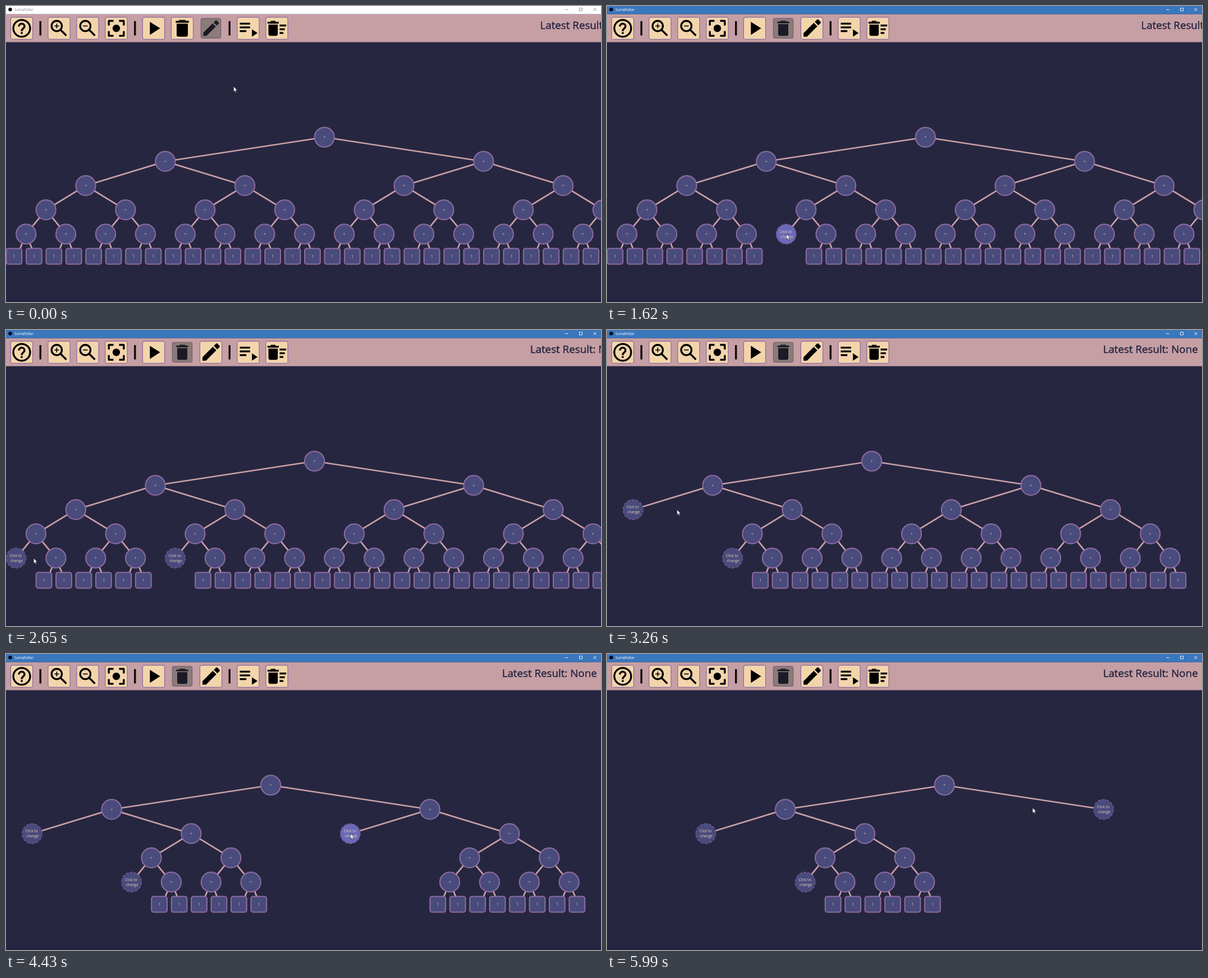
Write an HTML page with a canvas that moves like this. It is 1060 px wide and 528 px high and loops after 6850 ms.

```html
<!DOCTYPE html>
<html lang="en">
<head>
<meta charset="utf-8">
<title>Sumafolitar</title>
<style>
html, body { margin: 0; width: 100%; height: 100%; overflow: hidden; background: #272641; }
canvas { display: block; }
</style>
</head>
<body>
<canvas id="stage" width="1060" height="528"></canvas>
<script>
const ctx = document.getElementById('stage').getContext('2d');
const W = 1060, LOOP = 6850, TURN = Math.PI * 2;
const FONT = '"Open Sans", "Noto Sans", sans-serif';
const SPREAD = 283.5, ROW = 43.22, ROOT_Y = 234, DEPTH = 5, R = 18;
const INK = '#272541', PURPLE = '#8e6c9f', NODE = '#494b7c', HOVER = '#6a6ab9', CREAM = '#e6cfb4';

// Each click: the pointer leaves GAP after the last one, rests LEAD before pressing, holds for HOLD
const GAP = 90, LEAD = 130, HOLD = 80;
const clicks = [
  { press: 600, ease: 2 },
  { press: 1535, ease: 1.13, node: 20, bend: 13 },
  { press: 2570, ease: 2.65, node: 16, aside: 13 },
  { press: 3180, ease: 2, node: 4 },
  { press: 4350, ease: 1.44, node: 6, bend: 95 },
  { press: 5060, ease: 2, node: 3 }
];

const clamp = k => Math.min(1, Math.max(0, k));

function walk(gone, id = 1, x = 0, depth = 0, out = []) {
  const leaf = depth === DEPTH, removed = gone.has(id);
  const dx = leaf || removed ? 0 : SPREAD / 2 ** depth;
  out.push({ id, x, y: ROOT_Y + ROW * depth, dx, leaf, removed });
  if (dx) {
    walk(gone, id * 2, x - dx, depth + 1, out);
    walk(gone, id * 2 + 1, x + dx, depth + 1, out);
  }
  return out;
}

// A tree wider than the window starts at its left edge, a narrower one is centred
function layout(gone) {
  const nodes = walk(gone);
  const left = Math.min(...nodes.map(n => n.x)) - R;
  const right = Math.max(...nodes.map(n => n.x + (n.leaf ? 11.3 : R)));
  const wide = right - left > W;
  const shift = wide ? -left : W / 2 + 0.3 - (left + right) / 2;
  for (const n of nodes) n.x += shift;
  return { nodes, width: Math.max(W, right - left) };
}

const goneAfter = n => new Set(clicks.slice(0, n).map(c => c.node));

// Where the pointer goes for each click
const goals = clicks.map(({ node, aside = 0 }, i) => {
  if (!node) return { x: 314, y: 41 };
  const { x, y } = layout(goneAfter(i)).nodes.find(n => n.id === node);
  return { x: x + aside, y: y - 0.5 };
});

function pointerAt(t) {
  let from = { x: 405, y: 143 }, go = 70;
  for (let i = 0; i < clicks.length; i++) {
    const { press, ease, bend = 0 } = clicks[i], to = goals[i];
    const k = 1 - (1 - clamp((t - go) / (press - LEAD - go))) ** ease;
    if (k < 1) {
      const dx = to.x - from.x, dy = to.y - from.y;
      const side = bend * 4 * k * (1 - k) / Math.hypot(dx, dy);
      return { x: from.x + dx * k + dy * side, y: from.y + dy * k - dx * side };
    }
    from = to;
    go = press + HOLD + GAP;
  }
  const drift = clamp((t - 5300) / 150);
  return { x: from.x + 2.5 * drift, y: from.y - 3 * drift };
}

function rect(x, y, w, h, fill = ctx.fillStyle) {
  ctx.fillStyle = fill;
  ctx.fillRect(x, y, w, h);
}

function label(str, x, y, size, fill, align = 'center') {
  ctx.font = `${size}px ${FONT}`;
  ctx.textAlign = align;
  ctx.fillStyle = fill;
  ctx.fillText(str, x, y);
}

function shape(fill, stroke, width) {
  ctx.fillStyle = fill;
  ctx.fill();
  ctx.strokeStyle = stroke;
  ctx.lineWidth = width;
  ctx.stroke();
}

function disc(x, y, r) {
  ctx.beginPath();
  ctx.arc(x, y, r, 0, TURN);
}

function box(x, y, w, h, r) {
  ctx.beginPath();
  ctx.roundRect(x, y, w, h, r);
}

function poly(...pts) {
  ctx.beginPath();
  for (let i = 0; i < pts.length; i += 2) ctx.lineTo(pts[i], pts[i + 1]);
}

// Icons live on a 24 unit grid
function lens() {
  disc(9.5, 9.5, 5.5);
  ctx.stroke();
  poly(13.6, 13.6, 19.75, 19.75);
  ctx.stroke();
  rect(7, 9, 5, 1);
}

function bin(cx, top, w, h) {
  rect(cx - w / 2 + 2.5, top, w - 5, 1.1);
  rect(cx - w / 2 - 1, top + 1, w + 2, 2);
  box(cx - w / 2, top + 4, w, h, [0, 0, 2, 2]);
  ctx.fill();
}

function triangle(x, y, w, h) {
  poly(x, y, x, y + h, x + w, y + h / 2);
  ctx.fill();
}

const icons = {
  help() {
    disc(12, 12, 9);
    ctx.stroke();
    ctx.beginPath();
    ctx.arc(12, 10, 3, Math.PI, TURN);
    ctx.bezierCurveTo(15, 12, 12, 12.2, 12, 15);
    ctx.stroke();
    rect(11, 16, 2, 2);
  },
  zoomIn() {
    lens();
    rect(9, 7, 1, 5);
  },
  zoomOut: lens,
  center() {
    disc(12, 12, 4);
    ctx.fill();
    ctx.translate(12, 12);
    for (let i = 0; i < 4; i++) {
      ctx.rotate(TURN / 4);
      poly(-8, -3, -8, -8, -3, -8);
      ctx.stroke();
    }
  },
  play: () => triangle(8, 5, 11, 14),
  remove: () => bin(12, 3, 12, 14),
  edit() {
    ctx.translate(3, 21);
    ctx.rotate(-TURN / 8);
    poly(0, 0, 2.65, -2.65, 18.3, -2.65, 18.3, 2.65, 2.65, 2.65);
    ctx.fill();
    box(19.8, -2.65, 4.4, 5.3, [0, 1, 1, 0]);
    ctx.fill();
  },
  playAll() {
    for (let i = 0; i < 3; i++) rect(3, 6 + 4 * i, i < 2 ? 11 : 7, 2);
    triangle(16, 13, 6, 8);
  },
  clearAll() {
    bin(8, 4, 10, 12);
    for (let i = 0; i < 3; i++) rect(15, 8 + 4 * i, 7 - 1.5 * i, 2);
  }
};
const toolbar = 'help | zoomIn zoomOut center | play remove edit | playAll clearAll'.split(' ');

function drawButton(name, x, on, over) {
  ctx.save();
  ctx.translate(x, 39.8);
  if (on) ctx.scale(0.9, 0.9);
  box(-19.6, -19.6, 39.2, 39.2, 3.5);
  if (on) shape(over ? '#9b8a85' : '#8b7b79', '#6f616c', 1.3);
  else shape(over ? '#f8e3c5' : '#f3d5ab', PURPLE, 1.3);
  ctx.scale(5 / 3, 5 / 3);
  ctx.translate(-12, -12);
  ctx.fillStyle = ctx.strokeStyle = on ? '#1b1a25' : '#000';
  ctx.lineWidth = 2;
  ctx.lineJoin = 'round';
  icons[name]();
  ctx.restore();
}

function drawToolbar(tool, mouse, width) {
  rect(0, 14.5, W, 50, '#c59fa4');
  let x = 28;
  for (const name of toolbar) {
    if (name === '|') {
      x -= 17.75;
      rect(x - 1.7, 27, 3.4, 25.5, '#0a0a0c');
      x += 33.25;
      continue;
    }
    const over = Math.max(Math.abs(mouse.x - x), Math.abs(mouse.y - 40)) < 20;
    drawButton(name, x, name === tool, over);
    x += 51;
  }
  const text = 'Latest Result: None';
  label(text, width - 7.3, 41, 18.75, INK, 'right');
  ctx.strokeStyle = INK;
  ctx.lineWidth = 0.45;
  ctx.strokeText(text, width - 7.3, 41);
}

function drawTitleBar(active) {
  rect(0, 0, W, 14.5, active ? '#3a77bd' : '#ffffff');
  disc(7.5, 6.3, 3.2);
  ctx.fillStyle = '#000';
  ctx.fill();
  const ink = active ? '#ffffff' : '#8c8c8c';
  label('Sumafolitar', 15, 8.8, 6.3, ink, 'left');
  ctx.strokeStyle = ink;
  ctx.lineWidth = 0.9;
  ctx.beginPath();
  ctx.moveTo(996, 6.5);
  ctx.lineTo(1001.5, 6.5);
  ctx.rect(1021.5, 3.8, 5, 5);
  for (const side of [-1, 1]) {
    ctx.moveTo(1049 - 2.6 * side, 3.8);
    ctx.lineTo(1049 + 2.6 * side, 9);
  }
  ctx.stroke();
}

function drawNode({ x, y, leaf, removed }, mouse) {
  const fill = Math.hypot(mouse.x - x, mouse.y - y) < R ? HOVER : NODE;
  if (removed) {
    disc(x, y, 17.7);
    ctx.setLineDash([5, 3]);
    shape(fill, '#6d5788', 1.6);
    ctx.setLineDash([]);
    label('Click to', x - 0.8, y - 2.2, 6.6, CREAM);
    label('change', x + 1, y + 6.8, 6.6, CREAM);
  } else if (leaf) {
    box(x - 17.5, y - 17.5, 27.8, 27.8, 3.5);
    shape(fill, PURPLE, 2);
    label('1', x - 3.4, y - 1, 6.6, CREAM);
  } else {
    disc(x, y, 17.6);
    shape(fill, PURPLE, 2);
    label('+', x, y + 2.4, 6.6, CREAM);
  }
}

function drawTree(nodes, mouse) {
  ctx.strokeStyle = '#c9a1a7';
  ctx.lineWidth = 2.7;
  for (const { x, y, dx } of nodes) {
    if (!dx) continue;
    poly(x - dx, y + ROW, x, y, x + dx, y + ROW);
    ctx.stroke();
  }
  for (const node of nodes) drawNode(node, mouse);
}

function drawPointer({ x, y }, pressed) {
  if (pressed) {
    disc(x + 0.3, y + 0.3, 6.8);
    ctx.fillStyle = 'rgba(190, 196, 56, 0.8)';
    ctx.fill();
  }
  ctx.save();
  ctx.translate(x + 0.5, y + 0.5);
  poly(0, 0, 0, 9.4, 2.1, 7.5, 3.6, 10.8, 5, 10.2, 3.6, 6.9, 6.5, 6.9);
  ctx.closePath();
  shape('#fff', '#15151f', 0.6);
  ctx.restore();
}

function draw(t) {
  const mouse = pointerAt(t);
  const done = clicks.filter(c => c.press + HOLD <= t).length;
  const pressed = clicks.some(c => t >= c.press && t < c.press + HOLD);
  const { nodes, width } = layout(goneAfter(done));
  rect(0, 0, W, 528, '#272641');
  rect(0, 524, W, 4, '#242340');
  drawTree(nodes, mouse);
  drawToolbar(done ? 'remove' : 'edit', mouse, width);
  drawTitleBar(t >= clicks[0].press);
  drawPointer(mouse, pressed);
}

const start = performance.now();
function frame() {
  draw((performance.now() - start) % LOOP);
  requestAnimationFrame(frame);
}
frame();
</script>
</body>
</html>
```
